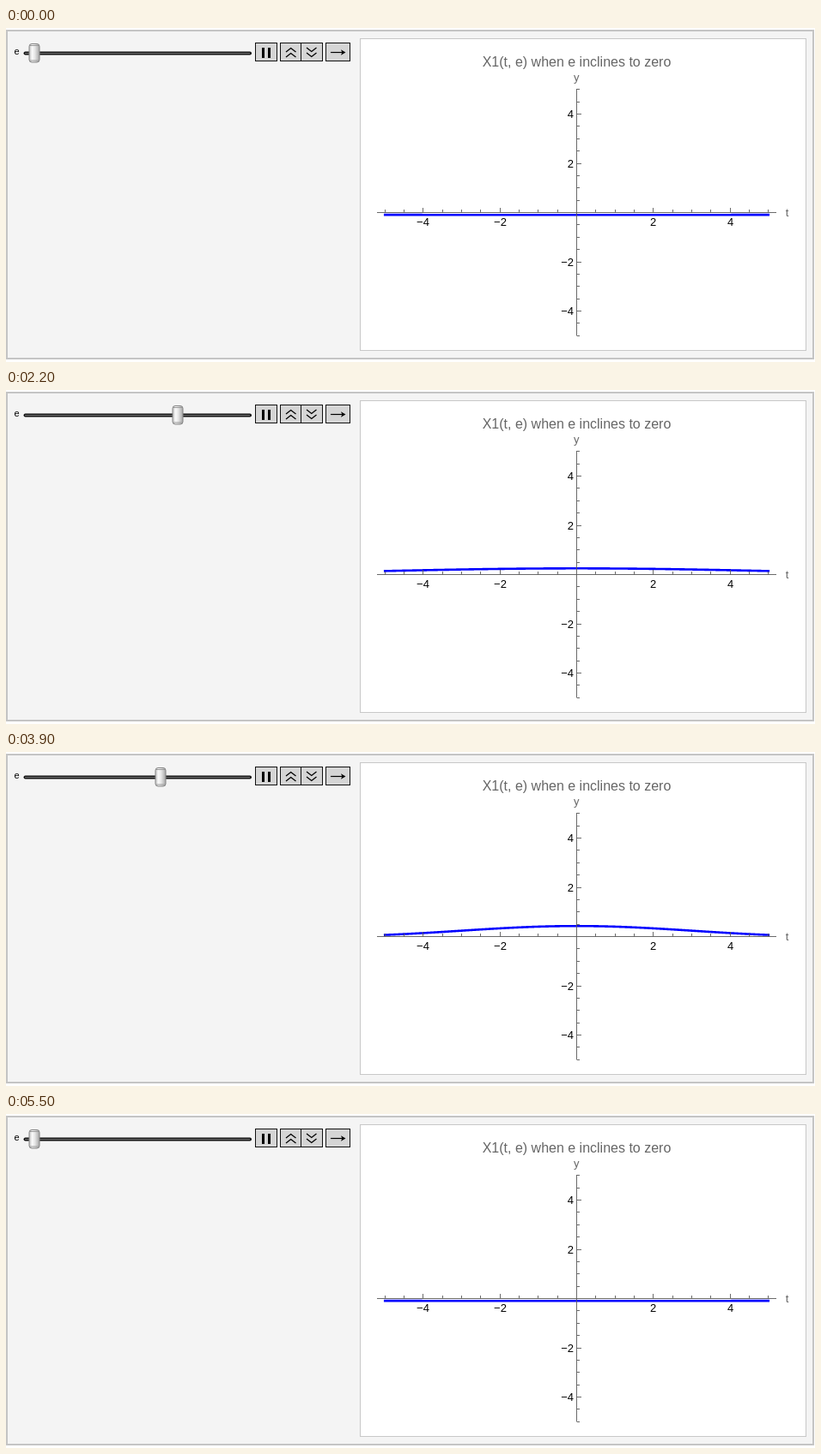
Write an HTML page with a canvas that moves like this. It is 942x390 px and loops after 6 s.

```html
<!DOCTYPE html>
<html lang="en">
<head>
<meta charset="utf-8">
<title>X1(t, e)</title>
<style>
html, body { margin: 0; width: 100%; height: 100%; overflow: hidden; background: #fff; }
canvas { display: block; }
</style>
</head>
<body>
<canvas id="stage" width="942" height="390"></canvas>
<script>
const ctx = document.getElementById('stage').getContext('2d');
const SANS = '"Liberation Sans", Arial, sans-serif';
const LOOP = 6000, STEP = 100;
const origin = { x: 664.5, y: 215.5 };
const unit = { x: 44.65, y: 28.75 };
const GRAY = '#666';

const clamp = (v, lo, hi) => Math.min(Math.max(v, lo), hi);
const toX = t => origin.x + t * unit.x;
const toY = y => origin.y - y * unit.y;

function box(x, y, w, h, fill, stroke, lineWidth = 1) {
  ctx.fillStyle = fill;
  ctx.fillRect(x, y, w, h);
  ctx.strokeStyle = stroke;
  ctx.lineWidth = lineWidth;
  ctx.strokeRect(x, y, w, h);
}

function polyline(points, color, width) {
  ctx.beginPath();
  points.forEach(([x, y]) => ctx.lineTo(x, y));
  ctx.strokeStyle = color;
  ctx.lineWidth = width;
  ctx.stroke();
}

function text(str, x, y, size, color, align = 'center') {
  ctx.font = `${size}px ${SANS}`;
  ctx.textAlign = align;
  ctx.fillStyle = color;
  ctx.fillText(str, x, y);
}

// The parameter sweeps forward and back in equal steps, resting at the start.
function parameterAt(ms) {
  const tick = Math.floor((ms % LOOP) / STEP);
  const k = clamp(Math.min(tick - 4, 55 - tick), 0, 25);
  return Math.max(-10.2, (k - 13.2) * 5 / 6);
}

function kernel(t, e) {
  return Math.abs(t) < 1e-6 ? 1 / e : e * (Math.sin(t / e) / t) ** 2;
}

function drawButtons() {
  [[290.5, 25], [319.5, 24], [343.5, 25], [372.5, 28]]
    .forEach(([x, w]) => box(x, 17.5, w, 21, '#d5d5d5', '#111'));
  ctx.fillStyle = '#000';
  ctx.fillRect(298, 23, 3, 12);
  ctx.fillRect(305, 23, 3, 12);
  for (const dy of [0, 6]) {
    polyline([[326, 28 + dy], [331.7, 23.5 + dy], [337.5, 28 + dy]], '#000', 1.3);
    polyline([[350, 23 + dy], [355.8, 27.5 + dy], [361.5, 23 + dy]], '#000', 1.3);
  }
  polyline([[378, 28.5], [393, 28.5]], '#000', 1.2);
  ctx.beginPath();
  ctx.moveTo(395.5, 28.5);
  ctx.lineTo(390, 25.3);
  ctx.lineTo(391.3, 28.5);
  ctx.lineTo(390, 31.7);
  ctx.fillStyle = '#000';
  ctx.fill();
}

function drawSlider(e) {
  text('e', 9.5, 31, 11, '#000', 'left');
  ctx.beginPath();
  ctx.roundRect(20.5, 27.5, 265.5, 4, 2);
  ctx.fillStyle = '#111';
  ctx.fill();
  ctx.fillStyle = '#777';
  ctx.fillRect(22, 29, 262, 1);

  const x = Math.round(153 + e * 11.73);
  const shade = ctx.createLinearGradient(x - 6, 0, x + 6, 0);
  shade.addColorStop(0, '#c4c4c4');
  shade.addColorStop(0.3, '#fafafa');
  shade.addColorStop(0.55, '#e6e6e6');
  shade.addColorStop(1, '#a6a6a6');
  ctx.beginPath();
  ctx.roundRect(x - 6, 18.5, 12, 21.5, 3);
  ctx.fillStyle = shade;
  ctx.fill();
  ctx.strokeStyle = '#858585';
  ctx.lineWidth = 1;
  ctx.stroke();
  for (const y of [20.5, 38]) polyline([[x - 5, y], [x + 5, y]], '#999', 1);
}

function drawCurve(e) {
  const points = [];
  for (let i = -1000; i <= 1000; i++) {
    const t = i / 200;
    points.push([toX(t), toY(kernel(t, e))]);
  }
  ctx.save();
  ctx.beginPath();
  ctx.rect(430, 71, 470, 288);
  ctx.clip();
  ctx.lineCap = 'square';
  ctx.lineJoin = 'round';
  polyline(points, '#00f', 2.6);
  ctx.restore();
}

function drawAxes() {
  const color = 'rgba(90,90,90,0.9)';
  polyline([[432, origin.y], [897, origin.y]], color, 1);
  polyline([[origin.x, 71], [origin.x, 359]], color, 1);
  for (let i = -10; i <= 10; i++) {
    if (!i) continue;
    const major = i % 4 === 0;
    const length = major ? 5.5 : 3.5;
    const x = Math.floor(toX(i / 2)) + 0.5;
    const y = Math.floor(toY(i / 2)) + 0.5;
    polyline([[x, origin.y], [x, origin.y - length]], color, 1);
    polyline([[origin.x, y], [origin.x + length, y]], color, 1);
    if (major) {
      const label = String(i / 2).replace('-', '\u2212');
      text(label, x, 231, 13, '#000');
      text(label, 661, y + 4.5, 13, '#000', 'right');
    }
  }
}

function draw(ms) {
  const e = parameterAt(ms);
  ctx.fillStyle = '#fff';
  ctx.fillRect(0, 0, 942, 390);
  box(1, 3, 939, 383, '#f4f4f4', '#c4c4c4', 2);
  box(412.5, 12.5, 519, 364, '#fff', '#c8c8c8');
  drawSlider(e);
  drawButtons();
  drawCurve(e);
  drawAxes();
  text('X1(t, e) when e inclines to zero', 664.5, 45, 16, GRAY);
  text('y', 664.3, 61.5, 13, GRAY);
  text('t', 909.5, 220, 13, GRAY);
}

function loop() {
  draw(performance.now());
  requestAnimationFrame(loop);
}
loop();
</script>
</body>
</html>
```
